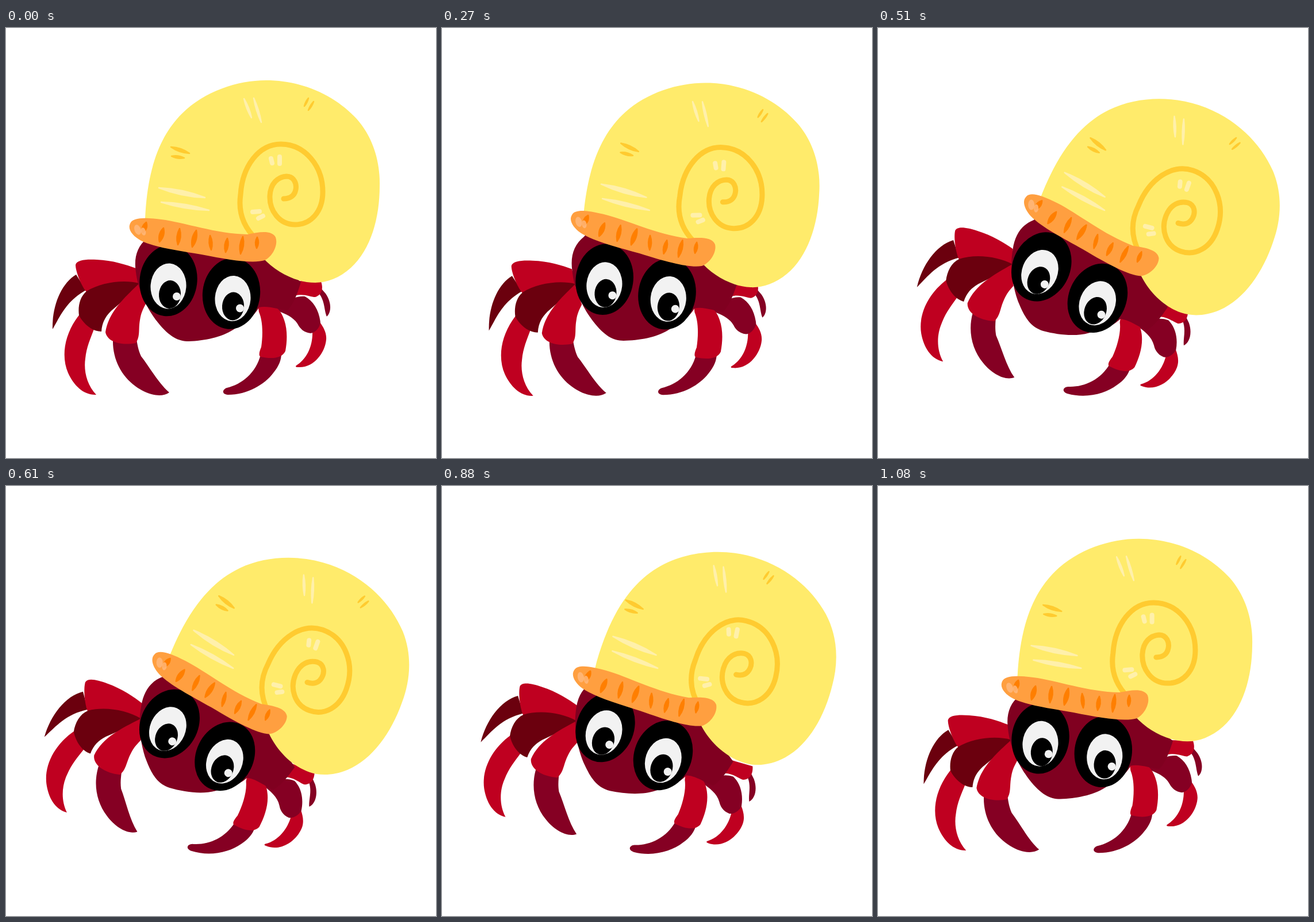
Write an HTML page that moves like this. It is 748x748 px and loops after 1110 ms.

```html
<!DOCTYPE html>
<html lang="en">
<head>
<meta charset="utf-8">
<title>Hermit crab</title>
<style>
html, body { margin: 0; width: 100%; height: 100%; overflow: hidden; background: #fff; }
svg { display: block; width: 100vw; height: 100vh; }
.red { fill: #bf0020; }
.wine { fill: #850023; }
.dark { fill: #6b000e; }
.white { fill: #f2f2f2; }
.line { fill: none; stroke-linecap: round; stroke-linejoin: round; }
</style>
</head>
<body>
<svg viewBox="0 0 748 748">
  <g id="leftLegs">
    <path class="wine" d="M186 542C185 575 200 605 225 623C245 638 270 644 284 634C265 618 250 590 235 571C230 560 229 552 227 542Z"/>
    <path class="red" d="M129 497C102 530 95 570 108 600C118 622 135 639 157 638C140 620 135 595 138 575C140 555 147 540 153 524Z"/>
    <path class="dark" d="M122 429C95 445 80 485 81 524C95 500 105 475 139 456Z"/>
    <path class="red" d="M121 412C123 403 140 402 158 403C185 404 210 412 226 418L234 445C200 438 165 445 140 459C133 452 121 425 121 412Z"/>
    <path class="dark" d="M232 444C205 437 165 442 140 458C128 468 125 485 127 500C135 515 150 528 166 528C167 512 173 502 183 492L232 450Z"/>
    <path class="red" d="M231 445C205 470 178 495 173 529C176 546 200 553 226 548C234 535 230 525 233 508C235 495 238 490 243 480Z"/>
  </g>
  <g id="rightLegs">
    <path class="wine" d="M544 461C555 475 553 490 558 502C566 495 567 478 556 462L549 454Z"/>
    <path class="red" d="M505 440L548 441C553 455 548 465 538 468C530 468 520 462 505 465Z"/>
    <path class="red" d="M533 528C534 550 525 575 505 587Q502 590 508 590C535 592 555 565 557 542C558 530 552 520 546 512Z"/>
    <path class="wine" d="M465 488C485 480 500 465 520 467C535 475 545 492 547 513C545 522 538 530 530 531C518 530 511 522 508 516C500 502 485 497 470 491Z"/>
    <path class="wine" d="M443 568C435 600 410 620 384 626C376 629 375 637 386 638C420 638 450 620 465 600C475 588 479 577 479 566Z"/>
    <path class="red" d="M438 480C455 476 472 484 478 495C490 515 490 540 486 562C480 575 462 576 443 572C438 570 442 560 444 555C447 535 447 510 440 494Z"/>
  </g>
  <path id="head" fill="#800020" d="M245 366C228 380 222 400 226 425C230 460 250 495 264 512C285 538 300 545 318 545C345 544 375 538 395 525C410 515 430 505 440 486C455 482 475 490 490 491C500 480 506 465 513 442L450 390L250 360Z"/>
  <g id="eyes"></g>
  <g id="shell">
    <path fill="#ffeb6b" d="M242 332C246 240 270 185 306 149C345 110 403 91 452 91C520 91 575 120 610 158C640 192 651 235 650 275C650 330 635 385 600 417C580 435 558 443 538 443C505 443 470 425 447 400L430 380L242 345Z"/>
    <path class="line" stroke="#ffcb30" stroke-width="9" d="M435 367C412 345 404 318 408 290C411 240 440 202 478 202C520 202 551 240 551 285C551 320 530 342 503 342C475 342 458 317 459 292C460 270 473 259 488 258C501 258 506 271 504 281C502 292 494 297 483 297"/>
  </g>
  <g id="shine" fill="#fff0ab" stroke="#fff0ab">
    <path class="line" stroke-width="8" d="M461 227L463 235M476 224L476 236M429 320L441 319M439 331L447 327"/>
  </g>
  <g id="brim">
    <path fill="#ff9f40" d="M216 340C220 330 240 329 270 333C310 338 365 358 420 359C440 355 462 351 469 364C474 378 463 398 450 404C430 410 390 404 340 394C300 387 260 382 235 370C220 362 211 350 216 340Z"/>
    <g id="ridges" fill="#ff7f00" stroke="#ff7f00"></g>
    <g fill="#ffba80" opacity=".8">
      <ellipse cx="229" cy="351" rx="5.5" ry="9" transform="rotate(-20 229 351)"/>
      <ellipse cx="239" cy="354" rx="4" ry="7" transform="rotate(-15 239 354)"/>
    </g>
    <g id="flecks" fill="#ffcb30" stroke="#ffcb30"></g>
  </g>
</svg>
<script>
const $ = id => document.getElementById(id);
const add = (id, markup) => $(id).insertAdjacentHTML('beforeend', markup);

// Slim almond stroke from one point to another
function leaf(id, x1, y1, x2, y2, w) {
  const len = Math.hypot(x2 - x1, y2 - y1);
  const nx = -(y2 - y1) / len * w, ny = (x2 - x1) / len * w;
  const mx = (x1 + x2) / 2, my = (y1 + y2) / 2;
  add(id, `<path stroke-width="2.5" stroke-linejoin="round"
    d="M${x1} ${y1}Q${mx + nx} ${my + ny} ${x2} ${y2}Q${mx - nx} ${my - ny} ${x1} ${y1}Z"/>`);
}

function eye(x, y, whiteX, whiteY, pupilX, pupilY) {
  const oval = (cx, cy, rx, ry, tilt, cls = '') =>
    `<ellipse class="${cls}" cx="${cx}" cy="${cy}" rx="${rx}" ry="${ry}" transform="rotate(${tilt} ${cx} ${cy})"/>`;
  add('eyes', oval(x, y, 50, 62, 7) + oval(whiteX, whiteY, 31, 39.5, 4, 'white') +
    oval(pupilX, pupilY, 19, 24.5, 4) + oval(pupilX + 12, pupilY + 3.5, 7, 7, 0, 'white'));
}

eye(282.5, 439.5, 282.5, 449, 285, 463.5);
eye(392, 462, 394.5, 470.5, 395, 484);

[[244, 338, 238, 356, 7], [274, 348, 267, 372, 7], [302, 349, 299, 377, 6], [331, 352, 324, 381, 7],
 [355, 361, 357, 386, 5], [385, 366, 382, 390, 6], [412, 363, 408, 393, 6], [437, 364, 436, 383, 5]]
  .forEach(r => leaf('ridges', ...r));
[[287, 207, 319, 218, 5], [288, 223, 310, 226, 4], [526, 122, 519, 136, 2], [535, 128, 526, 143, 2]]
  .forEach(r => leaf('flecks', ...r));
[[414, 123, 427, 156, 3], [431, 122, 444, 164, 3], [266, 278, 346, 295, 7], [270, 303, 353, 317, 6]]
  .forEach(r => leaf('shine', ...r));

const LOOP = 1110, HALF = LOOP / 2, STEPS = 33;

// Each part swings about a pivot: id, delay, angle, pivot x, y, shift x, y
const onShell = [483, 297, 41.5, 45], onBody = [282.5, 448.5, -1, -27];
const parts = [
  ['brim', 28, 19.7, ...onShell],
  ['shine', 55, 19.7, ...onShell],
  ['shell', 83, 19.8, ...onShell],
  ['eyes', 100, 19.3, ...onBody],
  ['head', 106, 19, ...onBody],
  ['rightLegs', 122, 18.6, ...onBody],
  ['leftLegs', 146, 18.6, ...onBody]
];

const ease = u => u < .5 ? .5 * (2 * u) ** 3.2 : 1 - .5 * (2 - 2 * u) ** 3.2;

function swing(t, delay) {
  const u = ((t - delay + LOOP) % LOOP) / HALF;
  return ease(u < 1 ? u : 2 - u);
}

function draw(now) {
  const step = LOOP / STEPS;
  const t = Math.floor((now % LOOP + 4) / step) % STEPS * step;
  for (const [id, delay, angle, x, y, dx, dy] of parts) {
    const p = swing(t, delay) - swing(0, delay);
    $(id).setAttribute('transform', `translate(${dx * p} ${dy * p}) rotate(${angle * p} ${x} ${y})`);
  }
}

const start = performance.now();
function tick() {
  draw(performance.now() - start);
  requestAnimationFrame(tick);
}
tick();
</script>
</body>
</html>
```
